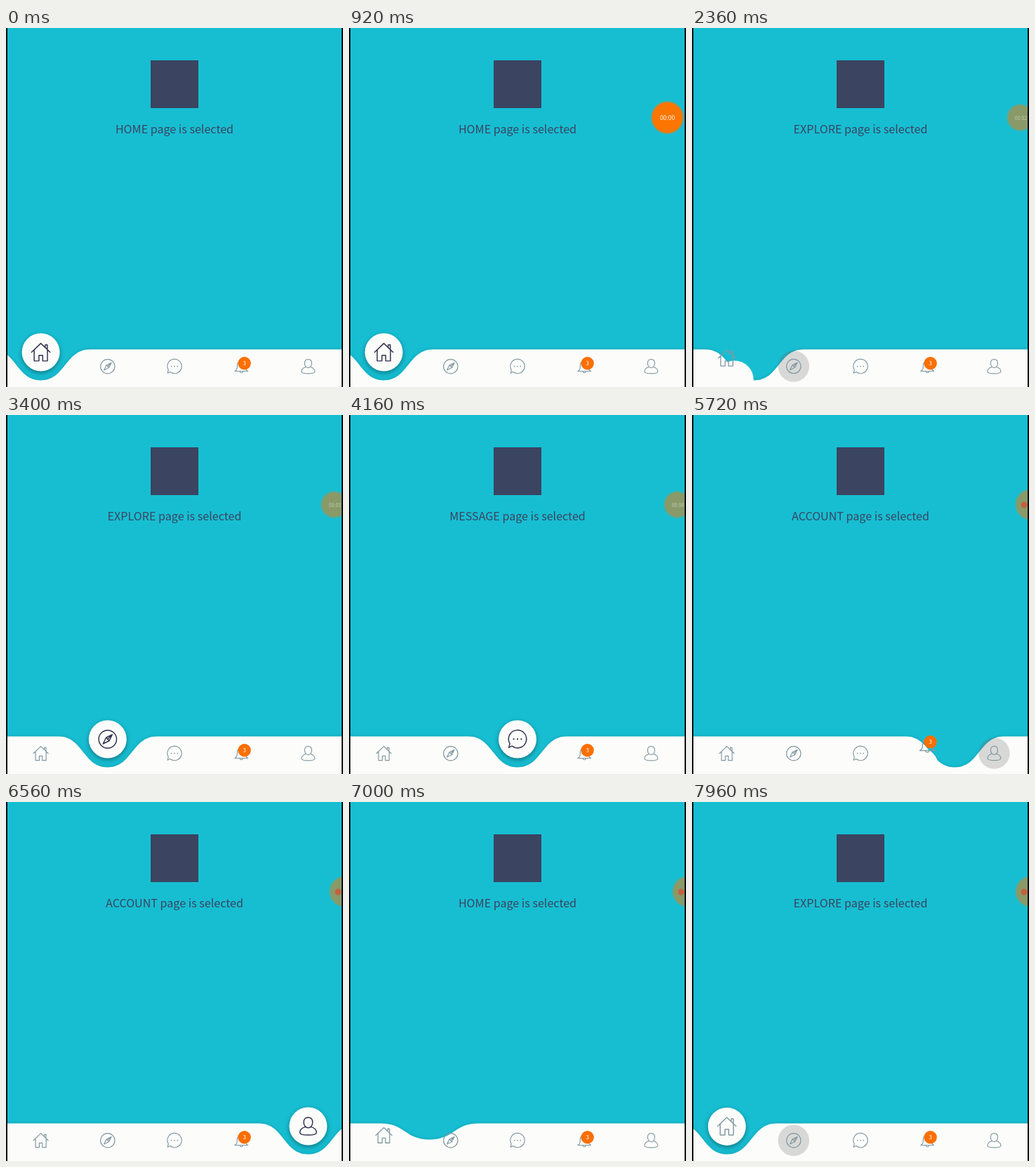
An HTML page with a canvas that plays this animation: 480x511 px, repeating every 8000 ms.

```html
<!DOCTYPE html>
<html lang="en">
<head>
<meta charset="utf-8">
<title>Curved bottom navigation</title>
<style>
html, body { margin: 0; width: 100%; height: 100%; overflow: hidden; background: #000; }
canvas { display: block; width: 480px; height: 511px; }
</style>
</head>
<body>
<canvas id="stage" width="480" height="511"></canvas>
<script>
const ctx = document.getElementById('stage').getContext('2d');
const LOOP = 8000, LEFT = 2, RIGHT = 478, CELL = 95.2;
const BAR_TOP = 457.5, WAVE_LOW = 501.5, WAVE_HIGH = 440, WAVE_W = 139.5;
const TEAL = '#17bed2', NAVY = '#3b4460', WHITE = '#fcfdfb';
const FONT = '"Noto Sans CJK JP", "Noto Sans CJK SC", "Noto Sans", sans-serif';

const pages = ['HOME', 'EXPLORE', 'MESSAGE', 'NOTIFICATION', 'ACCOUNT'];
const icons = [
  'M.3 12 12 .8 23.7 12M3.6 9V23h6v-7h4.8v7h6V9M17.6 6V2.6h2.6v6',
  'M.7 12a11.3 11.3 0 1 1 22.6 0a11.3 11.3 0 1 1-22.6 0M17.8 6.2 14 14 6.2 17.8 10 10zM10 10l4 4M12 12l5.8-5.8',
  'M5 20.6A11.3 11.3 0 1 0 2.3 17.5L1 22.6Z',
  'M1.5 19.5c3-1.5 4-3 4-9a6.5 7.5 0 0 1 13 0c0 6 1 7.5 4 9zM9.5 20a2.6 2.8 0 0 0 5 0M12 3V1',
  'M12 .8c4 0 5.6 2.6 5.6 6.2 0 4-2.5 7-5.6 7s-5.6-3-5.6-7C6.4 3.4 8 .8 12 .8M8.6 12.8C4 14 1.5 16 1.5 20c0 2 3 3.2 10.5 3.2S22.5 22 22.5 20c0-4-2.5-6-7.1-7.2'
].map(d => new Path2D(d));

// Each tap: time and the tab it opens. "side" is where its disc rises from.
const taps = [[-2000, 0], [2282, 1], [3680, 2], [4680, 3], [5642, 4], [6700, 0], [7950, 1]]
  .map(([at, tab], i, all) => {
    const from = i ? all[i - 1][1] : 4;
    return { at, tab, from, side: tab > from ? -1 : 1, time: Math.abs(tab - from) * 100 + 150 };
  });

const clamp = v => Math.min(1, Math.max(0, v));
const mix = (a, b, f) => a + (b - a) * f;
const centerX = tab => LEFT + CELL * (tab + .5);

// cubic-bezier(.4, 0, .2, 1)
function ease(v) {
  const x = clamp(v);
  let lo = 0, hi = 1;
  for (let i = 0; i < 20; i++) {
    const s = (lo + hi) / 2, r = 1 - s;
    if (1.2 * s * r * r + .6 * s * s * r + s * s * s < x) lo = s; else hi = s;
  }
  return x === 1 ? 1 : lo * lo * (3 - 2 * lo);
}
const ramp = (t, a, b) => ease((t - a) / (b - a));

function disc(x, y, r, fill) {
  ctx.fillStyle = fill;
  ctx.beginPath();
  ctx.arc(x, y, r, 0, 7);
  ctx.fill();
}

function label(text, x, y, size, fill) {
  ctx.font = size + 'px ' + FONT;
  ctx.textAlign = 'center';
  ctx.fillStyle = fill;
  ctx.fillText(text, x, y);
}

function shadow(color, blur, dy) {
  ctx.shadowColor = color;
  ctx.shadowBlur = blur;
  ctx.shadowOffsetY = dy;
}

function drawBar(tap, t) {
  const f = ease((t - tap.at) / tap.time);
  const x = mix(centerX(tap.from), centerX(tap.tab), f);
  const long = Math.abs(tap.tab - tap.from) > 1;
  const y = long ? mix(WAVE_HIGH, WAVE_LOW, Math.abs(2 * f - 1)) : WAVE_LOW;
  const h = WAVE_W / 2, q = WAVE_W / 4;
  ctx.save();
  shadow('rgba(0,40,60,.2)', 5, 0);
  ctx.fillStyle = WHITE;
  ctx.beginPath();
  ctx.moveTo(-120, BAR_TOP);
  ctx.lineTo(x - h, BAR_TOP);
  ctx.bezierCurveTo(x - q, BAR_TOP, x - q, y, x, y);
  ctx.bezierCurveTo(x + q, y, x + q, BAR_TOP, x + h, BAR_TOP);
  ctx.lineTo(600, BAR_TOP);
  ctx.lineTo(600, 540);
  ctx.lineTo(-120, 540);
  ctx.fill();
  ctx.restore();
}

function drawCell(tab, p, side, ripple) {
  const x = centerX(tab), y = 461.5 + (1 - p) * 20.25;
  if (p > 0) {
    ctx.save();
    if (p > .7) shadow('rgba(0,0,0,.38)', p * 7, p * 2.5);
    disc(x + (1 - p) * 27 * side, 461.5 + (1 - p) * 95, 27, WHITE);
    ctx.restore();
  }
  if (ripple > 0) disc(x, y, 22.2 * ripple, `rgba(110,110,110,${.25 * ripple})`);

  const scale = 1.125 * (.8 + .2 * p);
  ctx.save();
  ctx.translate(x, y);
  ctx.scale(scale, scale);
  ctx.translate(-12, -12);
  ctx.lineWidth = 1.3;
  ctx.lineJoin = ctx.lineCap = 'round';
  ctx.strokeStyle = p === 1 ? '#30304e' : '#8299a2';
  ctx.stroke(icons[tab]);
  if (tab === 2) for (const dx of [7.2, 12, 16.8]) disc(dx, 11.8, 1, ctx.strokeStyle);
  ctx.restore();

  if (tab === 3) {
    disc(x + 4.4, y - 4.5, 9.2, '#fb6f00');
    label('3', x + 4.4, y - 1.6, 8, '#fff');
  }
}

function drawTimer(t) {
  const docked = ramp(t, 1880, 2150), hidden = ramp(t, 4600, 4900);
  const x = 453.5 + 14 * docked + 15 * hidden, y = 127.5;
  const r = 22 - 4 * docked + 3 * hidden;
  const seconds = Math.max(0, Math.floor((t - 100) / 1000));
  const glow = ctx.createRadialGradient(x, y, r - 1, x, y, r + 2);
  glow.addColorStop(0, 'rgba(251,117,0,1)');
  glow.addColorStop(1, 'rgba(251,117,0,0)');
  ctx.save();
  ctx.globalAlpha = ramp(t, 150, 450) * (1 - .5 * docked);
  disc(x, y, r + 2, glow);
  if (hidden < .5) label('00:0' + seconds, x + docked, y + 3.3, r * .385, '#fff');
  else disc(473, y + .5, 4.5, '#ff2814');
  ctx.restore();
}

function draw(t) {
  let n = taps.length - 1;
  while (taps[n].at > t) n--;
  const tap = taps[n], next = taps[n + 1];

  ctx.fillStyle = '#000';
  ctx.fillRect(0, 0, 480, 511);
  ctx.save();
  ctx.beginPath();
  ctx.rect(LEFT, 0, RIGHT - LEFT, 511);
  ctx.clip();
  ctx.fillStyle = TEAL;
  ctx.fillRect(0, 0, 480, 511);
  ctx.fillStyle = NAVY;
  ctx.fillRect(206, 46, 68, 68);
  label(pages[tap.tab] + ' page is selected', 240, 150, 16.1, NAVY);

  drawBar(tap, t);
  pages.forEach((_, tab) => {
    let p = 0, side = 1, ripple = 0;
    if (tab === tap.tab) {
      p = ease((t - tap.at - tap.time / 4) / tap.time);
      side = tap.side;
      ripple = t < tap.at + 200 ? 1 : 0;
    } else if (n && tab === tap.from) {
      p = 1 - ease((t - tap.at) / 250);
      side = taps[n - 1].side;
    }
    if (next && tab === next.tab) ripple = ramp(t, next.at - 110, next.at - 20);
    drawCell(tab, p, side, ripple);
  });
  drawTimer(t);
  ctx.restore();
}

function tick() {
  draw(performance.now() % LOOP);
  requestAnimationFrame(tick);
}
tick();
</script>
</body>
</html>
```
